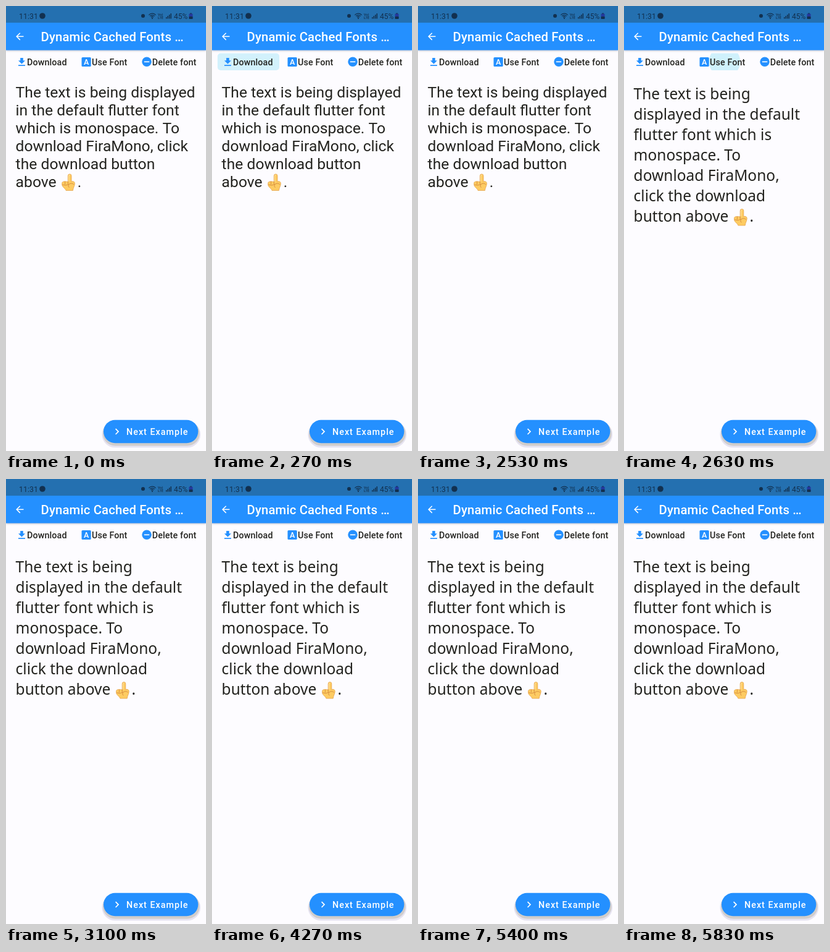
Write an HTML page with a canvas that moves like this. It is 324x720 px and loops after 5860 ms.

```html
<!DOCTYPE html>
<html lang="en">
<head>
<meta charset="utf-8">
<title>Font demo</title>
<style>
  html, body { margin: 0; width: 100%; height: 100%; overflow: hidden; background: #fdfcff; }
  canvas { display: block; width: 100%; height: 100%; }
</style>
</head>
<body>
<canvas id="stage"></canvas>
<script>
const W = 324, H = 720, LOOP = 5860, SWAP_AT = 2615;
const BLUE = '#2490ff', INK = '#23231f', STATUS_INK = '#12304f';
const canvas = document.getElementById('stage');
const ctx = canvas.getContext('2d');

const before = {
  font: '24.7px Roboto, sans-serif', y: 147.5, pitch: 29,
  lines: ['The text is being displayed', 'in the default flutter font',
    'which is monospace. To', 'download FiraMono, click', 'the download button', 'above ']
};
const after = {
  font: '24.5px "Noto Sans", sans-serif', y: 150.5, pitch: 33.1,
  lines: ['The text is being', 'displayed in the default', 'flutter font which is',
    'monospace. To', 'download FiraMono,', 'click the download', 'button above ']
};
const ripples = [
  { start: 30, left: 9, right: 109, x: 59 },
  { start: 2540, left: 113, right: 207, x: 163 }
];

let scale = 1;
function fit() {
  const dpr = window.devicePixelRatio || 1;
  const w = Math.round(innerWidth * dpr), h = Math.round(innerHeight * dpr);
  if (canvas.width !== w || canvas.height !== h) {
    canvas.width = w;
    canvas.height = h;
  }
  scale = w / W;
  ctx.setTransform(scale, 0, 0, h / H, 0, 0);
}

function text(str, x, y, font, color, spacing = 0) {
  ctx.font = font;
  ctx.letterSpacing = spacing + 'px';
  ctx.fillStyle = color;
  ctx.fillText(str, x, y);
  ctx.letterSpacing = '0px';
}

function box(x, y, w, h, color, r = 0) {
  ctx.fillStyle = color;
  ctx.beginPath();
  ctx.roundRect(x, y, w, h, r);
  ctx.fill();
}

function disc(x, y, r, color) {
  ctx.fillStyle = color;
  ctx.beginPath();
  ctx.arc(x, y, r, 0, Math.PI * 2);
  ctx.fill();
}

function line(points, color, width) {
  ctx.strokeStyle = color;
  ctx.lineWidth = width;
  ctx.beginPath();
  points.forEach(([x, y]) => ctx.lineTo(x, y));
  ctx.stroke();
}

function shape(path, fill, stroke, width = 1) {
  const p = new Path2D(path);
  if (fill) { ctx.fillStyle = fill; ctx.fill(p); }
  if (stroke) { ctx.strokeStyle = stroke; ctx.lineWidth = width; ctx.stroke(p); }
}

function statusBar() {
  box(0, 0, W, 27, '#2470b0');
  text('11:31', 21, 20.5, '12.3px Roboto, sans-serif', STATUS_INK, 0.1);
  disc(59, 16, 4.8, STATUS_INK);
  disc(222, 16, 3, STATUS_INK);
  ctx.lineCap = 'butt';
  for (const r of [2.6, 5.2, 7.8]) {
    ctx.strokeStyle = STATUS_INK;
    ctx.lineWidth = 1.2;
    ctx.beginPath();
    ctx.arc(237, 20, r, -Math.PI * 0.76, -Math.PI * 0.24);
    ctx.stroke();
  }
  disc(237, 20, 1.1, STATUS_INK);
  text('Vo)', 246, 15.5, '500 5.5px Roboto, sans-serif', STATUS_INK);
  text('LTE', 246, 20.5, '500 5.5px Roboto, sans-serif', STATUS_INK);
  for (let i = 0; i < 4; i++) box(259 + i * 2.5, 18 - i * 2, 1.5, 2.5 + i * 2, STATUS_INK);
  text('45%', 272, 20.5, '12px Roboto, sans-serif', STATUS_INK);
  box(298, 11.5, 3, 2, STATUS_INK);
  box(296.5, 12.5, 6, 8.5, '#24389c', 1);
  box(296.5, 17, 6, 4, STATUS_INK, 1);
}

function appBar() {
  ctx.save();
  ctx.shadowColor = 'rgba(40,40,70,.28)';
  ctx.shadowBlur = 3 * scale;
  ctx.shadowOffsetY = 1.5 * scale;
  box(0, 26, W, 45.5, BLUE);
  ctx.restore();
  statusBar();
  ctx.lineCap = 'butt';
  line([[28.5, 49.3], [17.5, 49.3]], '#fff', 1.5);
  line([[22.8, 43.7], [17.2, 49.3], [22.8, 54.9]], '#fff', 1.5);
  text('Dynamic Cached Fonts …', 56.6, 56.5, '450 20.3px Roboto, sans-serif', '#fff', 0.15);
}

function ripple({ start, left, right, x }, now) {
  const t = now - start;
  if (t <= 0 || t >= 540) return;
  ctx.save();
  ctx.beginPath();
  ctx.roundRect(left, 76.5, right - left, 27.5, 5);
  ctx.clip();
  ctx.globalAlpha = Math.min(1, t / 75) * Math.min(1, (540 - t) / 320);
  disc(x, 90, 8 + 0.19 * t, '#cff1fc');
  ctx.restore();
}

function toolbar() {
  const font = '450 14.3px Roboto, sans-serif';
  const label = (str, x) => text(str, x, 95.2, font, INK, 0.12);
  ctx.save();
  ctx.translate(0, 0.5);
  shape('M23.2 83.5h4.6v4.3h3.2l-5.5 5.5-5.5-5.5h3.2z', BLUE);
  box(20, 94.8, 11, 1.7, BLUE);
  label('Download', 34);
  box(122.5, 82.5, 15.2, 15, BLUE, 1.6);
  ctx.textAlign = 'center';
  text('A', 130.1, 94.5, '500 12.5px Roboto, sans-serif', '#fff');
  ctx.textAlign = 'left';
  label('Use Font', 139);
  disc(228, 89.8, 7.7, BLUE);
  box(223.8, 89, 8.4, 1.6, '#fff');
  label('Delete font', 236.8);
  ctx.restore();
}

// Raised index finger, drawn in a 24 by 28 box.
function hand(x, y) {
  ctx.save();
  ctx.translate(x, y);
  ctx.lineCap = ctx.lineJoin = 'round';
  shape('M10.8 13V3.2a2.8 2.8 0 0 1 5.6 0V12.5C19.5 11.5 22 13 21.8 16C21.5 20 19.5 22 18.8 27H7.5C7 24 1.2 21.5 1.2 17.5V15C1.2 12.5 5 11.5 10.8 13Z',
    '#fdcb62', '#e29a3f', 0.7);
  shape('M12.2 12V3.4a1.5 1.5 0 0 1 1.6-1.6', null, '#ffe7a6', 1);
  shape('M6 13V17M10.8 13V16.5M2 17.8Q7 20 12 17T20 17M12 17.5Q10 20 12.5 22', null, '#cf8136', 0.8);
  ctx.restore();
}

function paragraph({ font, y, pitch, lines }) {
  lines.forEach((str, i) => text(str, 15.6, y + i * pitch, font, INK));
  const last = lines.length - 1, base = y + last * pitch;
  const end = 15.6 + ctx.measureText(lines[last]).width;
  hand(end + 1.8, base - 21);
  text('.', end + 28, base, font, INK);
}

function nextButton() {
  box(155.5, 672, 159.5, 42.5, '#e6e3f1', 21);
  box(157, 672, 156.5, 39.5, '#d0cdcb', 19.5);
  box(158, 669.8, 153.3, 37.4, BLUE, 18.7);
  ctx.lineCap = 'butt';
  ctx.lineJoin = 'miter';
  line([[177.6, 684.2], [182, 688.6], [177.6, 693]], '#fff', 1.7);
  text('Next Example', 195, 693.8, '450 14.3px Roboto, sans-serif', '#fff', 1.03);
}

const origin = performance.now();
function draw() {
  const now = (performance.now() - origin) % LOOP;
  fit();
  box(0, 0, W, H, '#fdfcff');
  appBar();
  ripples.forEach(r => ripple(r, now));
  toolbar();
  paragraph(now < SWAP_AT ? before : after);
  nextButton();
  requestAnimationFrame(draw);
}
draw();
</script>
</body>
</html>
```
